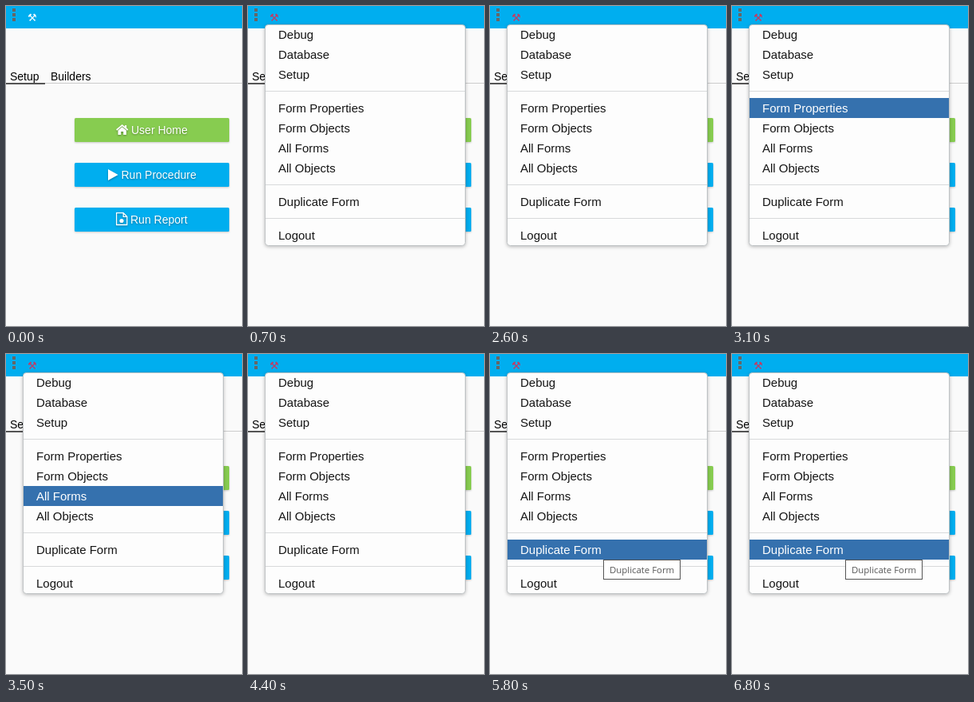
Recreate the animation shown at these times as an HTML page. Size 296x400 px, loop 6.9 s.

```html
<!DOCTYPE html>
<html lang="en">
<head>
<meta charset="utf-8">
<title>Options menu</title>
<style>
  html, body { margin: 0; width: 100%; height: 100%; overflow: hidden; background: #fafafa; }
  svg { display: block; width: 296px; height: 400px; font: 14px "Liberation Sans", Arial, sans-serif; }
  .btn { filter: drop-shadow(0 1px 1px #0003); }
  .label { fill: #fff; filter: drop-shadow(0 1px 1px #0005); }
  #menu { font-size: 15px; }
  #panel { fill: #fdfdfd; stroke: #bfc3c5; filter: drop-shadow(0 1px 2px #0004); }
  #tip text { font: 11.4px "Open Sans", "Noto Sans", sans-serif; fill: #575757; }
</style>
</head>
<body>
<svg viewBox="0 0 296 400">
  <rect width="296" height="400" fill="#fafafa"/>
  <rect width="296" height="28" fill="#00aeef"/>
  <path d="M8 3h4v4h-4zM8 9h4v4h-4zM8 15h4v4h-4z" fill="#666"/>
  <text id="tools" x="27" y="19" font-family="DejaVu Sans, sans-serif" font-weight="bold" font-size="13">⚒</text>

  <text x="5" y="93">Setup</text>
  <text x="56" y="93">Builders</text>
  <rect x="49" y="96" width="247" height="1" fill="#ccc"/>
  <rect y="96" width="49" height="2" fill="#555"/>

  <g class="btn">
    <rect x="86" y="140" width="194" height="30" rx="1.5" fill="#87cc50"/>
    <rect x="86" y="196" width="194" height="30" rx="1.5" fill="#00aeef"/>
    <rect x="86" y="252" width="194" height="30" rx="1.5" fill="#00aeef"/>
  </g>
  <g class="label">
    <path d="M138.6 155l7.1-6 7.1 6" fill="none" stroke="#fff" stroke-width="1.7"/>
    <path d="M149 149h2.2v4h-2.2zM140.5 155.6l5.2-4.3 5.2 4.3v5.4h-3.7v-4h-3v4h-3.7z"/>
    <text x="157" y="160">User Home</text>
    <path d="M128 204l12.7 7-12.7 7z"/>
    <text x="144.5" y="216">Run Procedure</text>
    <path d="M138.6 258.7h8.6l4.6 4.6v10.2h-13.2zM147.2 258.7v4.6h4.6" fill="none" stroke="#fff" stroke-width="1.3"/>
    <circle cx="145" cy="268.5" r="2.6"/>
    <text x="156" y="272">Run Report</text>
  </g>

  <g id="menu">
    <rect id="panel" x="21.5" y="23.5" width="251" height="276" rx="4"/>
    <path d="M22 106.5h250M22 223.5h250M22 265.5h250" stroke="#d8dadb"/>
    <rect id="bar" x="22" width="250" height="25" fill="#3571ae"/>
  </g>
  <g id="tip">
    <rect x="142.5" y="257.5" width="96" height="24" fill="#fff" stroke="#555"/>
    <text x="150" y="274">Duplicate Form</text>
  </g>
</svg>
<script>
  const LOOP = 6900, HOVER = 300, OPEN = 400, TIP = 5600, TIP_FADE = 200;
  const [tools, menu, bar, tip] = ["tools", "menu", "bar", "tip"].map(id => document.getElementById(id));

  const items = [
    ["Debug", 23], ["Database", 48], ["Setup", 73],
    ["Form Properties", 115], ["Form Objects", 140], ["All Forms", 165], ["All Objects", 190],
    ["Duplicate Form", 232], ["Logout", 274]
  ].map(([name, top]) => {
    const label = document.createElementNS("http://www.w3.org/2000/svg", "text");
    label.textContent = name;
    label.setAttribute("x", 38);
    label.setAttribute("y", top + 18);
    menu.append(label);
    return { label, top };
  });

  // [start time, hovered item], -1 for none
  const hovers = [
    [0, -1], [1400, 0], [1900, 1], [2000, 2], [2500, -1], [2900, 3],
    [3300, 4], [3500, 5], [3700, 6], [4400, -1], [4900, 7]
  ];

  function draw(now) {
    const t = now % LOOP;
    const active = hovers.findLast(([start]) => start <= t)[1];
    tools.setAttribute("fill", t < HOVER ? "#fff" : "#c8385f");
    menu.style.display = t < OPEN ? "none" : "";
    bar.style.display = active < 0 ? "none" : "";
    if (active >= 0) bar.setAttribute("y", items[active].top);
    items.forEach(({ label }, i) => label.setAttribute("fill", i === active ? "#fff" : "#151515"));
    tip.style.opacity = Math.min(1, Math.max(0, (t - TIP) / TIP_FADE));
  }

  const start = performance.now();
  function tick() {
    draw(performance.now() - start);
    requestAnimationFrame(tick);
  }
  tick();
</script>
</body>
</html>
```
